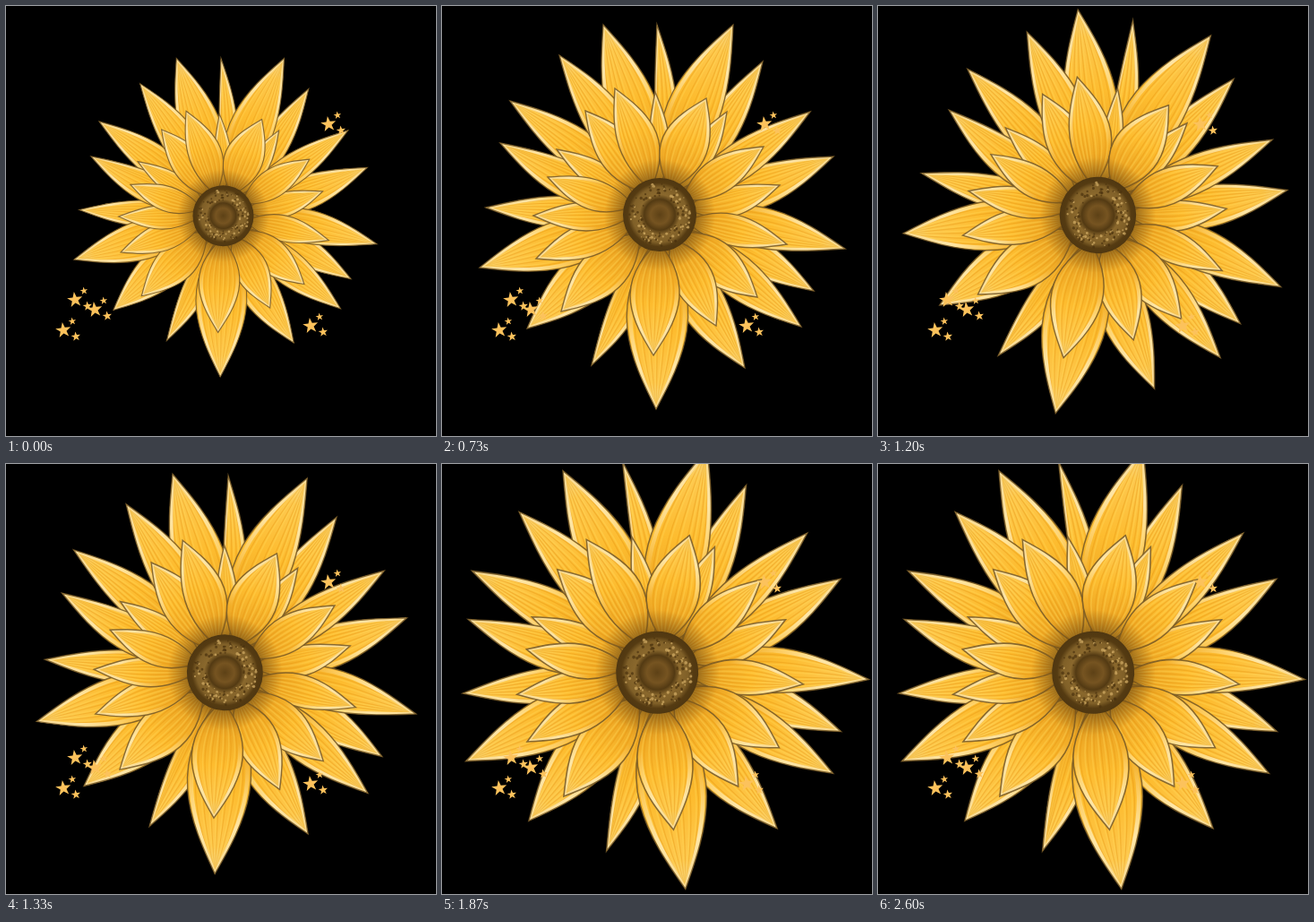
Recreate the animation shown at these times as an HTML page with a canvas. Size 480x480 px, loop 2670 ms.

```html
<!DOCTYPE html>
<html>
<head>
<meta charset="utf-8">
<style>
html, body { margin: 0; width: 100%; height: 100%; overflow: hidden; background: #000; }
canvas { display: block; }
</style>
</head>
<body>
<canvas id="stage" width="480" height="480"></canvas>
<script>
const ctx = document.getElementById('stage').getContext('2d');
const LOOP = 2670, TAU = Math.PI * 2;
const CX = 243, CY = 233;

// Held poses: start time, scale, rotation in degrees, shift
const poses = [
  [0, 0.829, 0, 0, 0],
  [270, 1, 0, 0, 0],
  [800, 1.042, 11, 1, 0],
  [1330, 1.036, 1.8, 1, 0],
  [1870, 1.123, -8.5, -2, 1]
];

// Petals: tip x, tip y, half-width on the counter-clockwise and clockwise side
const outer = [
  [240, 21, 4, 22], [180, 21, 26, 34], [358, 62, 18, 24], [325, 21, 38, 24],
  [437, 168, 18, 30], [411, 118, 20, 22], [415, 318, 28, 16], [450, 271, 30, 17],
  [401, 358, 24, 24], [338, 404, 20, 33], [167, 401, 24, 11], [239, 450, 35, 36],
  [95, 360, 28, 30], [49, 225, 20, 17], [42, 292, 28, 27], [76, 106, 20, 26],
  [65, 153, 28, 14], [131, 55, 20, 30]
];
const inner = [
  [128, 160, 15, 15], [318, 118, 14, 17], [377, 200, 12, 22], [238, 96, 9, 14],
  [160, 117, 20, 25], [193, 92, 18, 28], [295, 103, 30, 24], [359, 157, 20, 20],
  [385, 266, 20, 16], [352, 325, 24, 24], [306, 357, 24, 22], [133, 341, 27, 26],
  [236, 390, 27, 30], [105, 282, 19, 20], [102, 234, 18, 15], [118, 191, 20, 15]
];
const starGroups = [[77, 328], [99, 339], [64, 362], [360, 132], [340, 357]];

function seeded(seed) {
  return () => (seed = (seed * 16807) % 2147483647) / 2147483647;
}

function disc(x, y, r, fill) {
  ctx.fillStyle = fill;
  ctx.beginPath();
  ctx.arc(x, y, r, 0, TAU);
  ctx.fill();
}

function petal([tx, ty, ccw, cw], baseRadius) {
  const angle = Math.atan2(ty - CY, tx - CX);
  const length = Math.hypot(tx - CX, ty - CY) - baseRadius;
  ctx.save();
  ctx.translate(CX, CY);
  ctx.rotate(angle);
  ctx.translate(baseRadius, 0);

  const outward = w => ctx.bezierCurveTo(length * .4, w * 1.7, length * .72, w * .8, length, 0);
  const inward = w => ctx.bezierCurveTo(length * .72, w * .8, length * .4, w * 1.7, 0, 0);
  const shape = new Path2D();
  shape.moveTo(0, 0);
  shape.bezierCurveTo(length * .4, -ccw * 1.7, length * .72, -ccw * .8, length, 0);
  shape.bezierCurveTo(length * .72, cw * .8, length * .4, cw * 1.7, 0, 0);
  const vein = (w, width, style) => {
    ctx.lineWidth = width;
    ctx.strokeStyle = style;
    ctx.beginPath();
    ctx.moveTo(0, 0);
    outward(w);
    ctx.stroke();
  };

  const body = ctx.createLinearGradient(0, 0, length, 0);
  body.addColorStop(0, '#b97d1c');
  body.addColorStop(.3, '#f0ab27');
  body.addColorStop(.55, '#fdbc2f');
  body.addColorStop(.85, '#fdc84f');
  body.addColorStop(1, '#f5dca0');
  ctx.fillStyle = body;
  ctx.fill(shape);

  ctx.save();
  ctx.clip(shape);
  for (let u = -.75; u < .8; u += .25) {
    const w = u < 0 ? u * ccw : u * cw;
    vein(w, 1.2, 'rgba(226,145,14,.35)');
    vein(w + 2.5, 1.5, 'rgba(255,214,88,.35)');
  }
  const shine = ctx.createLinearGradient(0, 0, length, 0);
  shine.addColorStop(.35, 'rgba(255,240,195,0)');
  shine.addColorStop(.75, 'rgba(255,238,190,.8)');
  shine.addColorStop(1, 'rgba(255,240,200,.5)');
  vein(-ccw * .88, 4, shine);
  vein(cw * .88, 4, shine);
  ctx.restore();

  ctx.lineWidth = 1.4;
  ctx.strokeStyle = 'rgba(116,88,38,.85)';
  ctx.stroke(shape);
  ctx.restore();
}

function flowerHeart() {
  const random = seeded(41);
  const glow = ctx.createRadialGradient(CX, CY, 36, CX, CY, 62);
  glow.addColorStop(0, 'rgba(112,76,18,.75)');
  glow.addColorStop(1, 'rgba(150,100,20,0)');
  disc(CX, CY, 62, glow);

  const seeds = ctx.createRadialGradient(CX, CY, 0, CX, CY, 41);
  seeds.addColorStop(0, '#5d4116');
  seeds.addColorStop(.25, '#765421');
  seeds.addColorStop(.42, '#533a13');
  seeds.addColorStop(.55, '#8a682d');
  seeds.addColorStop(.75, '#806028');
  seeds.addColorStop(.87, '#553b12');
  seeds.addColorStop(1, '#4f3711');
  disc(CX, CY, 41, seeds);

  for (let i = 0; i < 150; i++) {
    const a = random() * TAU, r = 20 + random() * 15;
    disc(CX + Math.cos(a) * r, CY + Math.sin(a) * r, .6 + random() * 1.1,
      random() < .45 ? 'rgba(205,168,98,.75)' : 'rgba(74,50,14,.7)');
  }
}

function star(x, y, r) {
  ctx.fillStyle = '#fcc25c';
  ctx.beginPath();
  for (let i = 0; i < 10; i++) {
    const a = i * TAU / 10 - 1.7, d = i % 2 ? r * .4 : r;
    ctx.lineTo(x + Math.cos(a) * d, y + Math.sin(a) * d);
  }
  ctx.fill();
}

function draw(time) {
  const [, scale, degrees, dx, dy] = poses.filter(p => p[0] <= time).pop();
  ctx.fillStyle = '#000';
  ctx.fillRect(0, 0, 480, 480);
  ctx.save();
  ctx.translate(240 + dx, 240 + dy);
  ctx.rotate(degrees * TAU / 360);
  ctx.scale(scale, scale);
  ctx.translate(-240, -240);
  disc(CX, CY, 92, '#d69826');
  outer.forEach(p => petal(p, 22));
  inner.forEach(p => petal(p, 30));
  flowerHeart();
  ctx.restore();
  for (const [x, y] of starGroups) {
    star(x, y, 9);
    star(x + 10, y - 10, 4.5);
    star(x + 14, y + 7, 5.5);
  }
}

const start = performance.now();
function tick() {
  draw((performance.now() - start) % LOOP);
  requestAnimationFrame(tick);
}
tick();
</script>
</body>
</html>
```
